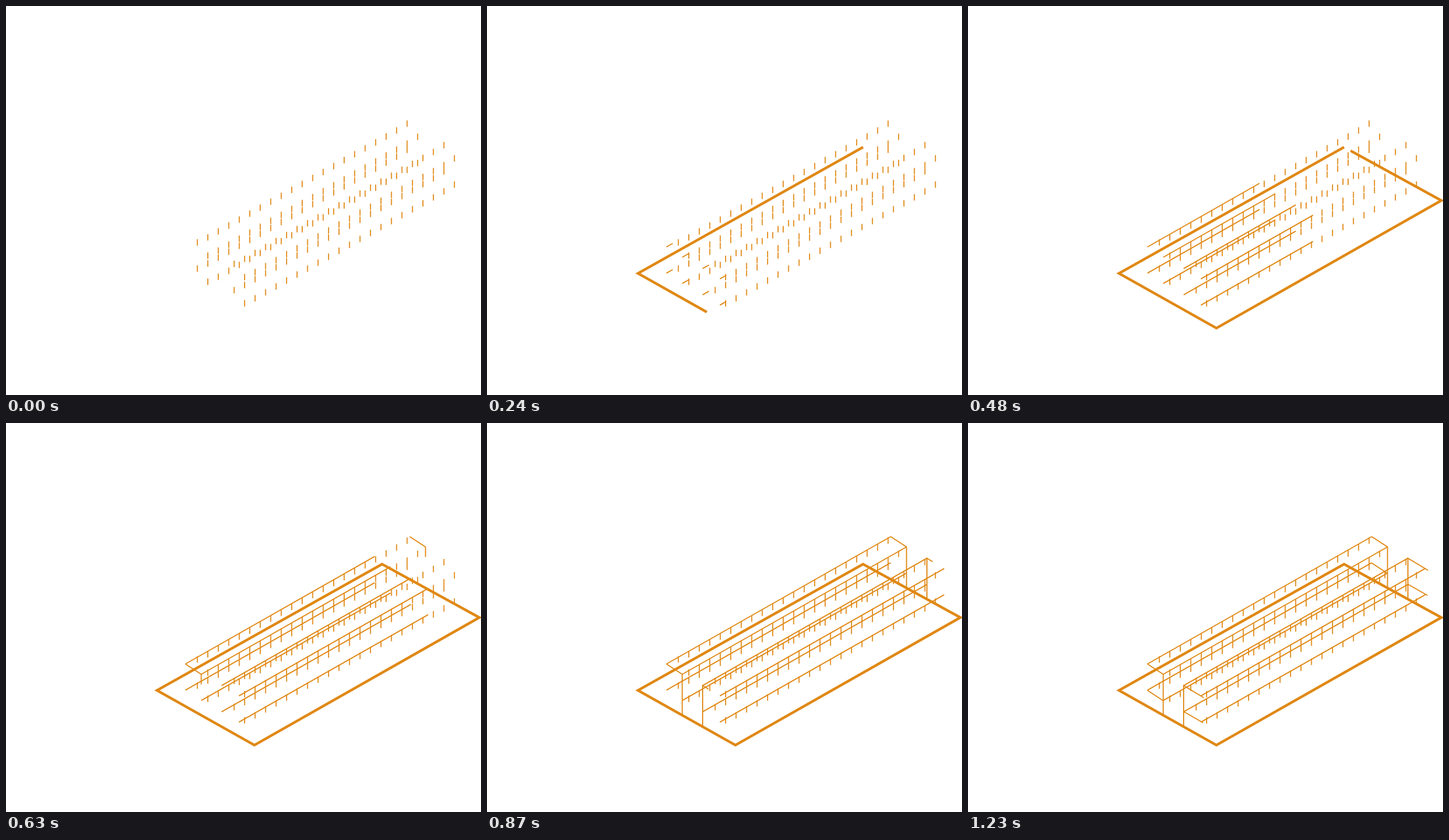
These frames come from a looping animation (826 by 678 pixels, 2640 ms). An HTML page with a canvas:

```html
<!DOCTYPE html>
<html lang="en">
<head>
<meta charset="utf-8">
<title>Wireframe build</title>
<style>
  html, body { margin: 0; width: 100%; height: 100%; overflow: hidden; background: #fff; }
  canvas { display: block; }
</style>
</head>
<body>
<canvas id="stage" width="826" height="678"></canvas>
<script>
const ctx = document.getElementById('stage').getContext('2d');
const STEP = 30, LOOP = 2640, LAST = 41;
const RUN = 390, RISE = 222; // front to back
const LEVEL = 45.7;          // upper to lower rail
const TICKS = 21, TICK = 11.2;

function ease(u) {
  u = Math.min(1, Math.max(0, u));
  return u * u * (3 - 2 * u);
}

// Strokes the first part p of a polyline
function trace(points, width, p) {
  if (p <= 0) return;
  let length = 0;
  ctx.beginPath();
  points.forEach(([x, y], i) => {
    ctx.lineTo(x, y);
    if (i) length += Math.hypot(x - points[i - 1][0], y - points[i - 1][1]);
  });
  if (p >= 1 && points[0] === points.at(-1)) ctx.closePath();
  ctx.setLineDash(p < 1 ? [length * p, length] : []);
  ctx.lineWidth = width;
  ctx.stroke();
}

// A column of ticks; its two ends sit slightly higher
function drawTicks(x, y) {
  for (let i = 0; i < TICKS; i++) {
    const drop = i % (TICKS - 1) ? 1.6 : 0;
    trace([[x, y + drop], [x, y + drop + TICK]], 1.8, 1);
    x += 18.24;
    y -= 10.35;
  }
}

// The same line on the front and the back face
function drawFaces(points, p) {
  trace(points, 1.9, p);
  trace(points.map(([x, y]) => [x + RUN, y - RISE]), 1.9, p);
}

function draw(now) {
  let n = Math.min(LAST, Math.floor((now % LOOP) / STEP));
  if (n === 22) n = 21; // one step is held
  const part = (start, span) => ease((n - start) / span);
  ctx.clearRect(0, 0, 826, 678);
  ctx.strokeStyle = '#e08814';

  for (let pair = 0; pair < 2; pair++)
    for (let side = 0; side < 2; side++)
      for (let low = 0; low < 2; low++) {
        drawTicks(332.7 + 64 * pair + 18.24 * side, 406.4 + 37.5 * pair + 23 * side + LEVEL * low);
        const x = 312 + 63 * pair + (27.5 + 2.5 * pair) * side;
        const y = 420 + 37.7 * pair + 18 * side + LEVEL * low;
        trace([[x, y], [x + RUN, y - RISE]], 1.9, part(6, 20));
      }

  const corner = [654, 246];
  trace([corner, [262.5, 466], [432, 561.5], [823, 339], corner], 4.5, part(0, 17));

  drawFaces([[312, 420], [339.5, 438], [339.5, 509.5]], part(16, 10.25));
  drawFaces([[375, 529], [375, 457.7], [410, 478.7]], part(23, 9));
  drawFaces([[339.5, 484], [312, 466]], part(32, 9));
  drawFaces([[409, 522.5], [375, 503]], part(32, 9));
}

let begin;
function tick(now) {
  begin ??= now;
  draw(now - begin);
  requestAnimationFrame(tick);
}
requestAnimationFrame(tick);
</script>
</body>
</html>
```
